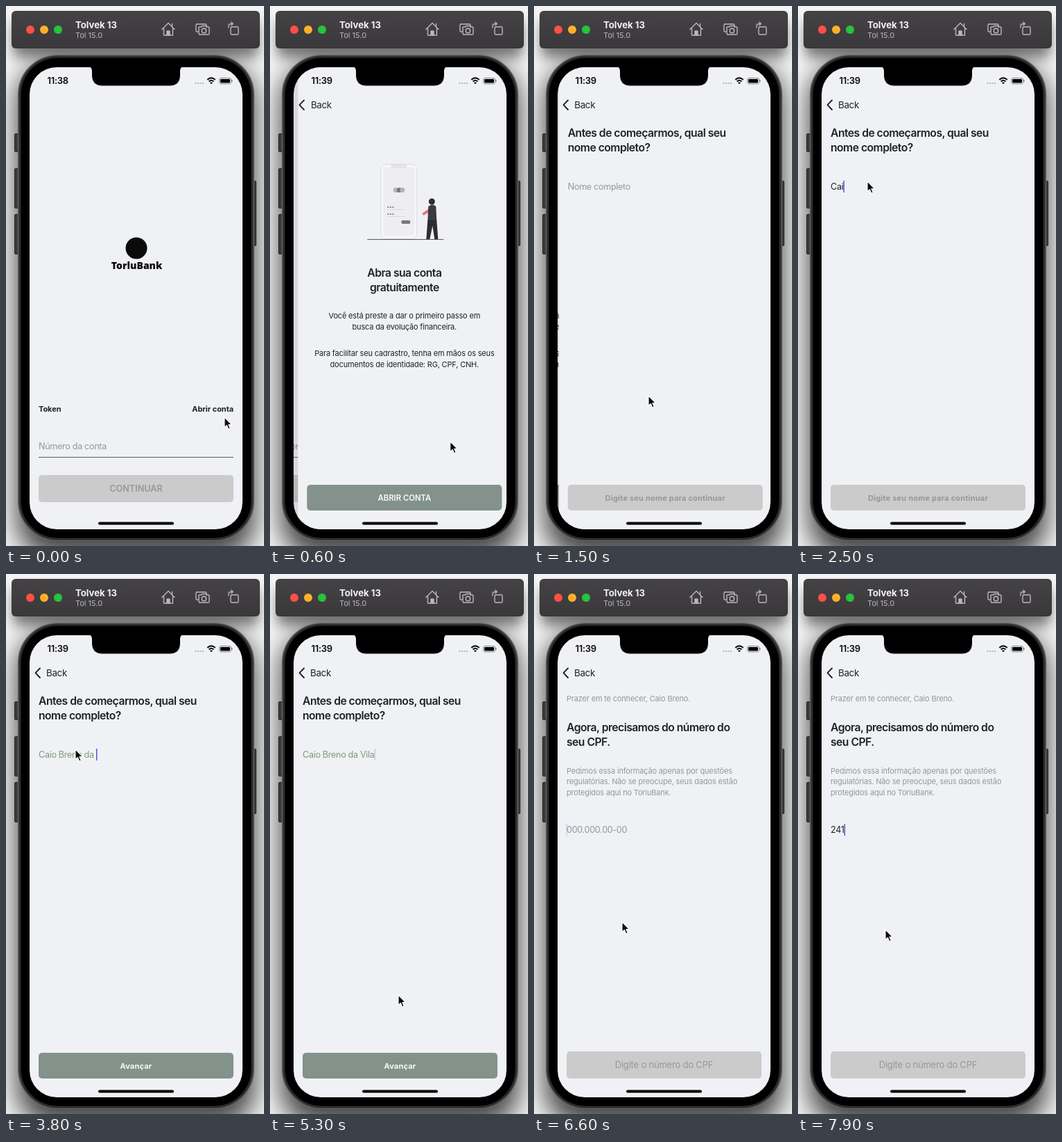
An HTML page that plays this animation: 372x776 px, repeating every 8000 ms.

```html
<!DOCTYPE html>
<html lang="pt-BR">
<head>
<meta charset="utf-8">
<title>Abertura de conta</title>
<style>
  html, body { margin: 0; width: 100%; height: 100%; overflow: hidden; background: #f4f4f4; }
  svg { display: block; width: 372px; height: 776px; }
  text { font-family: Inter, "Open Sans", sans-serif; white-space: pre; fill: #202124; }
  .h { font-size: 15.7px; font-weight: 600; letter-spacing: -.033em; }
  .field { font-size: 12.6px; letter-spacing: -.025em; }
  .small { font-size: 11px; letter-spacing: -.016em; }
  .bold { font-size: 11px; font-weight: 700; letter-spacing: -.005em; }
  .action { letter-spacing: .018em; }
  .back { font-size: 13.4px; letter-spacing: -.025em; }
  .mid { text-anchor: middle; }
  .grey { fill: #96979a; }
  .white { fill: #f7f8f8; }
  .brand { font: 800 14px "Open Sans", "Noto Sans", sans-serif; fill: #0b0b0b; }
  .line { fill: none; stroke: #b9b8ba; stroke-width: 1.4; stroke-linejoin: round; stroke-linecap: round; }
</style>
</head>
<body>
<svg viewBox="0 0 372 776">
  <defs>
    <clipPath id="glass"><rect x="34" y="88" width="307" height="664" rx="39"/></clipPath>
    <clipPath id="bar"><rect x="46" y="125" width="295" height="36"/></clipPath>
    <filter id="soft" x="-30%" y="-30%" width="160%" height="160%"><feGaussianBlur stdDeviation="18"/></filter>
    <filter id="near" x="-30%" y="-60%" width="160%" height="220%"><feGaussianBlur stdDeviation="9"/></filter>
    <linearGradient id="tool" x2="0" y2="1"><stop stop-color="#444245"/><stop offset="1" stop-color="#3a383b"/></linearGradient>
  </defs>

  <rect width="372" height="776" fill="#f4f4f4"/>
  <rect x="15" y="80" width="345" height="715" rx="58" opacity=".7" filter="url(#soft)"/>
  <rect x="10" y="22" width="354" height="52" rx="6" opacity=".5" filter="url(#near)"/>

  <g id="toolbar">
    <rect x="8" y="7" width="358" height="54" rx="6" fill="url(#tool)"/>
    <circle cx="35" cy="34" r="6" fill="#fe5047"/>
    <circle cx="55" cy="34" r="6" fill="#fdb02c"/>
    <circle cx="75" cy="34" r="6" fill="#27c33f"/>
    <text x="100" y="32" style="font-size:13.2px;font-weight:700;fill:#f1f0f2">Tolvek 13</text>
    <text x="100" y="46" style="font-size:11px;fill:#b7b6b8">Tol 15.0</text>
    <g class="line">
      <path d="M225 33.5 234 24.5 243 33.5M227.5 32V42H240.5V32M239.5 29.5V25.5"/>
      <path d="M232 42V36H236V42Z" fill="#b9b8ba"/>
      <path d="M277 37H275.5Q274 37 274 35.5V27.5Q274 26 275.5 26H287.5Q289 26 289 27.5V29"/>
      <path d="M279 30H282L283 28.5H288L289 30H291.5Q293 30 293 31.5V39.5Q293 41 291.5 41H279.5Q278 41 278 39.5V31Q278 30 279 30Z"/>
      <circle cx="285.5" cy="35.5" r="3.2"/>
      <rect x="324" y="30" width="11" height="11" rx="1.5"/>
      <path d="M321 31V29Q321 25.5 324.5 25.5H327M325 23.3 327.2 25.5 325 27.7"/>
    </g>
  </g>

  <g id="case">
    <g fill="#3b3b3c" stroke="#262626">
      <rect x="12.5" y="183.5" width="6" height="26" rx="1.5"/>
      <rect x="12.5" y="233.5" width="6" height="57" rx="1.5"/>
      <rect x="12.5" y="299.5" width="6" height="57" rx="1.5"/>
      <rect x="355" y="251.5" width="5.5" height="93" rx="1.5"/>
    </g>
    <rect x="17.7" y="70.7" width="339.6" height="697.6" rx="57" fill="#2d2d2e" stroke="#626263" stroke-width="1.5"/>
    <rect x="21.5" y="74.5" width="332" height="690" rx="53"/>
  </g>

  <g clip-path="url(#glass)">
    <g class="screen">
      <rect x="34" y="88" width="307" height="664" fill="#f0f1f5"/>
      <circle cx="188" cy="348" r="15.5" fill="#0b0b0b"/>
      <text class="brand mid" x="188.5" y="378">TorluBank</text>
      <text class="bold" x="47" y="583">Token</text>
      <text class="bold" x="328" y="583" text-anchor="end">Abrir conta</text>
      <text class="field grey" x="47" y="637">Número da conta</text>
      <path d="M47 648.5H328" stroke="#5d5e61"/>
      <rect x="47" y="674" width="281" height="39" rx="5" fill="#cbcbcb"/>
      <text class="mid grey" x="187.5" y="698" style="font-size:12.6px;font-weight:600">CONTINUAR</text>
    </g>

    <g class="screen">
      <rect x="34" y="88" width="307" height="664" fill="#f0f1f5"/>
      <g id="art">
        <rect x="153.5" y="227.5" width="52" height="107" rx="7" fill="#f6f6f7" stroke="#dcdcde"/>
        <rect x="157" y="232" width="45" height="98" rx="4" fill="#eeeef1"/>
        <rect x="168" y="228" width="23" height="5" rx="2.5" fill="#e4e4e6"/>
        <g fill="#b4b4b6"><circle cx="175" cy="264.5" r="3.5"/><circle cx="180" cy="264.5" r="3.5" fill="#77777a"/><circle cx="184.5" cy="264.5" r="3.5"/></g>
        <path d="M163 289H172M163 299H172" stroke="#66666a" stroke-width="1.6" stroke-dasharray="2 1.5"/>
        <path d="M163 292.5H188M163 302.5H188" stroke="#dadadc"/>
        <rect x="183" y="308" width="13" height="5" rx="2" fill="#77777a"/>
        <path d="M134 335.5H244" stroke="#59595c"/>
        <path d="M213 298 223 291 225 295 215 301Z" fill="#e5757a"/>
        <path d="M222 288Q228 283 233 288L234 309H221Z" fill="#3a3a40"/>
        <path d="M221 308H234L236 335H231L228 316 224 335H219Z" fill="#2c2c32"/>
        <circle cx="227" cy="281" r="4.5" fill="#2c2c32"/>
      </g>
      <g class="mid">
        <text class="h" x="187.5" y="389">Abra sua conta</text>
        <text class="h" x="187.5" y="410">gratuitamente</text>
        <text class="small" x="187.5" y="449">Você está preste a dar o primeiro passo em</text>
        <text class="small" x="187.5" y="465">busca da evolução financeira.</text>
        <text class="small" x="187.5" y="503">Para facilitar seu cadrastro, tenha em mãos os seus</text>
        <text class="small" x="187.5" y="519">documentos de identidade: RG, CPF, CNH.</text>
        <rect x="47" y="688" width="281" height="37" rx="5" fill="#83938b"/>
        <text class="white" x="187.5" y="711" style="font-size:11.3px;font-weight:600">ABRIR CONTA</text>
      </g>
    </g>

    <g class="screen">
      <rect x="34" y="88" width="307" height="664" fill="#f0f1f5"/>
      <text class="h" x="47" y="188">Antes de começarmos, qual seu</text>
      <text class="h" x="47" y="209">nome completo?</text>
      <text class="field" id="name" x="47" y="264"></text>
      <rect class="caret" y="251" width="1.5" height="17" fill="#5157d2"/>
      <rect id="nextBox" x="47" y="688" width="281" height="37" rx="5"/>
      <text class="bold action mid" id="nextText" x="187.5" y="711"></text>
    </g>

    <g class="screen">
      <rect x="34" y="88" width="307" height="664" fill="#f0f1f5"/>
      <text class="small grey" x="47" y="183">Prazer em te conhecer, Caio Breno.</text>
      <text class="h" x="47" y="226">Agora, precisamos do número do</text>
      <text class="h" x="47" y="247">seu CPF.</text>
      <text class="small grey" x="47" y="287">Pedimos essa informação apenas por questões</text>
      <text class="small grey" x="47" y="302">regulatórias. Não se preocupe, seus dados estão</text>
      <text class="small grey" x="47" y="318">protegidos aqui no TorluBank.</text>
      <text class="field" id="cpf" x="47" y="372"></text>
      <rect class="caret" y="359" width="1.5" height="17" fill="#5157d2"/>
      <rect x="47" y="686" width="281" height="39" rx="5" fill="#cbcbcb"/>
      <text class="mid grey" x="187.5" y="710" style="font-size:13px;letter-spacing:-.015em">Digite o número do CPF</text>
    </g>

    <g id="chrome">
      <path id="chevron" d="M49 135.5 42.5 142.2 49 149" fill="none" stroke="#202124" stroke-width="1.9" stroke-linecap="round" stroke-linejoin="round"/>
      <g clip-path="url(#bar)">
        <text class="back" y="147">Back</text>
        <text class="back" y="147">Back</text>
        <text class="back" y="147">Back</text>
      </g>
      <text id="clock" x="59.5" y="112" style="font-size:13px;font-weight:600;letter-spacing:-.02em;fill:#0b0b0b"></text>
      <path d="M272.5 111H286" stroke="#b4b5b8" stroke-width="2" stroke-dasharray="2 1.5"/>
      <g fill="none" stroke="#0b0b0b" stroke-width="2">
        <path d="M290.3 106Q296 100.8 301.7 106M292.6 108.6Q296 105.4 299.4 108.6"/>
      </g>
      <path d="M294 110.3Q296 108.7 298 110.3L296 112.3Z"/>
      <rect x="307.5" y="103.5" width="17" height="8.5" rx="2.5" fill="none" stroke="#8a8b8e"/>
      <rect x="309" y="105" width="14" height="5.5" rx="1.2"/>
      <path d="M326 106V109.5" stroke="#8a8b8e" stroke-width="1.3"/>
      <path d="M119 87Q124 88 124 93V99Q124 114.5 139 114.5H236Q251 114.5 251 99V93Q251 88 256 87Z"/>
      <rect x="133" y="741.5" width="109" height="4" rx="2"/>
    </g>
  </g>

  <path id="mouse" d="M0 0V14.5L3.4 11.5 5.7 17 8.2 16 5.9 10.6H10.4Z" fill="#0a0a0a" stroke="#fff" stroke-width="1.1" stroke-linejoin="round"/>
</svg>

<script>
const LOOP = 8000, STEP = 100, PUSH = 500, WIDTH = 307;
const pushes = [-PUSH, 300, 1118, 5701, Infinity];
const path = [
  [0, 315, 591], [200, 309, 577], [400, 309, 577], [900, 186, 699], [1250, 181, 699],
  [1500, 165, 560], [1900, 100, 254], [2100, 100, 252], [4300, 100, 252],
  [5000, 178, 560], [5300, 185, 605], [5550, 182, 697], [5700, 178, 690], [5800, 168, 657],
  [6200, 136, 530], [6600, 127, 500], [7100, 124, 506], [7500, 126, 511], [8000, 126, 511]
];
const fields = [
  { id: 'name', hint: 'Nome completo', text: 'Caio Breno da Vila', focus: 2000, blur: 5600, valid: 3600,
    keys: [2300, 2400, 2500, 2700, 2800, 2900, 3000, 3100, 3300, 3400, 3500, 3600, 3700, 3800, 3900, 4000, 4200, 4300] },
  { id: 'cpf', hint: '000.000.00-00', text: '241', focus: 6300, blur: Infinity, valid: Infinity,
    keys: [7200, 7400, 7700] }
];

const $ = id => document.getElementById(id);
const all = sel => [...document.querySelectorAll(sel)];
const screens = all('.screen'), labels = all('.back'), carets = all('.caret');
const clamp = (v, lo = 0, hi = 1) => Math.min(hi, Math.max(lo, v));

const dims = screens.map(s => {
  const veil = s.firstElementChild.cloneNode();
  veil.setAttribute('fill', '#000');
  return s.appendChild(veil);
});

const cubic = (u, a, b) => 3 * u * (1 - u) ** 2 * a + 3 * u * u * (1 - u) * b + u ** 3;

function ease(x) {
  if (x <= 0) return 0;
  if (x >= 1) return 1;
  let lo = 0, hi = 1;
  for (let i = 0; i < 24; i++) {
    const u = (lo + hi) / 2;
    if (cubic(u, .2833, .3183) < x) lo = u; else hi = u;
  }
  return cubic(lo, .99, .99);
}

function pointer(t) {
  const i = path.findIndex(p => p[0] > t);
  const [t0, x0, y0] = path[i - 1], [t1, x1, y1] = path[i];
  const k = (t - t0) / (t1 - t0);
  return [x0 + (x1 - x0) * k, y0 + (y1 - y0) * k];
}

function drawField(f, caret, t) {
  const n = f.keys.filter(k => k <= t).length;
  const el = $(f.id);
  el.textContent = n ? f.text.slice(0, n) : f.hint;
  el.style.fill = !n ? '#96979a' : t >= f.valid ? '#7d9a7b' : '#202124';
  const focused = t >= f.focus && t < f.blur;
  const typing = n && t - f.keys[n - 1] < 400;
  const blink = clamp(.5 - .8 * Math.cos((t - 450) / 500 * Math.PI), .25, 1);
  caret.setAttribute('x', 47 + (n ? el.getComputedTextLength() : -.5));
  caret.setAttribute('opacity', focused ? (typing ? 1 : blink) : 0);
}

function render(t) {
  const shown = pushes.map(s => ease((t - s) / PUSH));
  screens.forEach((s, i) => {
    const enter = shown[i], leave = shown[i + 1];
    s.setAttribute('transform', `translate(${WIDTH * (1 - enter) - .3 * WIDTH * leave} 0)`);
    s.setAttribute('display', enter > 0 && leave < 1 ? 'inline' : 'none');
    dims[i].setAttribute('opacity', .1 * leave);
    if (i) {
      labels[i - 1].setAttribute('x', 58 + 44.4 * (1 - enter) - 50 * leave);
      labels[i - 1].setAttribute('opacity', enter * (1 - leave));
    }
  });
  $('chevron').setAttribute('opacity', shown[1]);
  $('clock').textContent = t < 600 ? '11:38' : '11:39';

  fields.forEach((f, i) => drawField(f, carets[i], t));
  const ready = t >= fields[0].valid;
  $('nextBox').setAttribute('fill', ready ? '#83938b' : '#cbcbcb');
  $('nextText').textContent = ready ? 'Avançar' : 'Digite seu nome para continuar';
  $('nextText').style.fill = ready ? '#f7f8f8' : '#96979a';

  $('mouse').setAttribute('transform', `translate(${pointer(t)})`);
}

const start = performance.now();
function tick() {
  const t = performance.now() - start + 15;
  render(Math.floor(t / STEP) * STEP % LOOP);
  requestAnimationFrame(tick);
}
tick();
</script>
</body>
</html>
```
